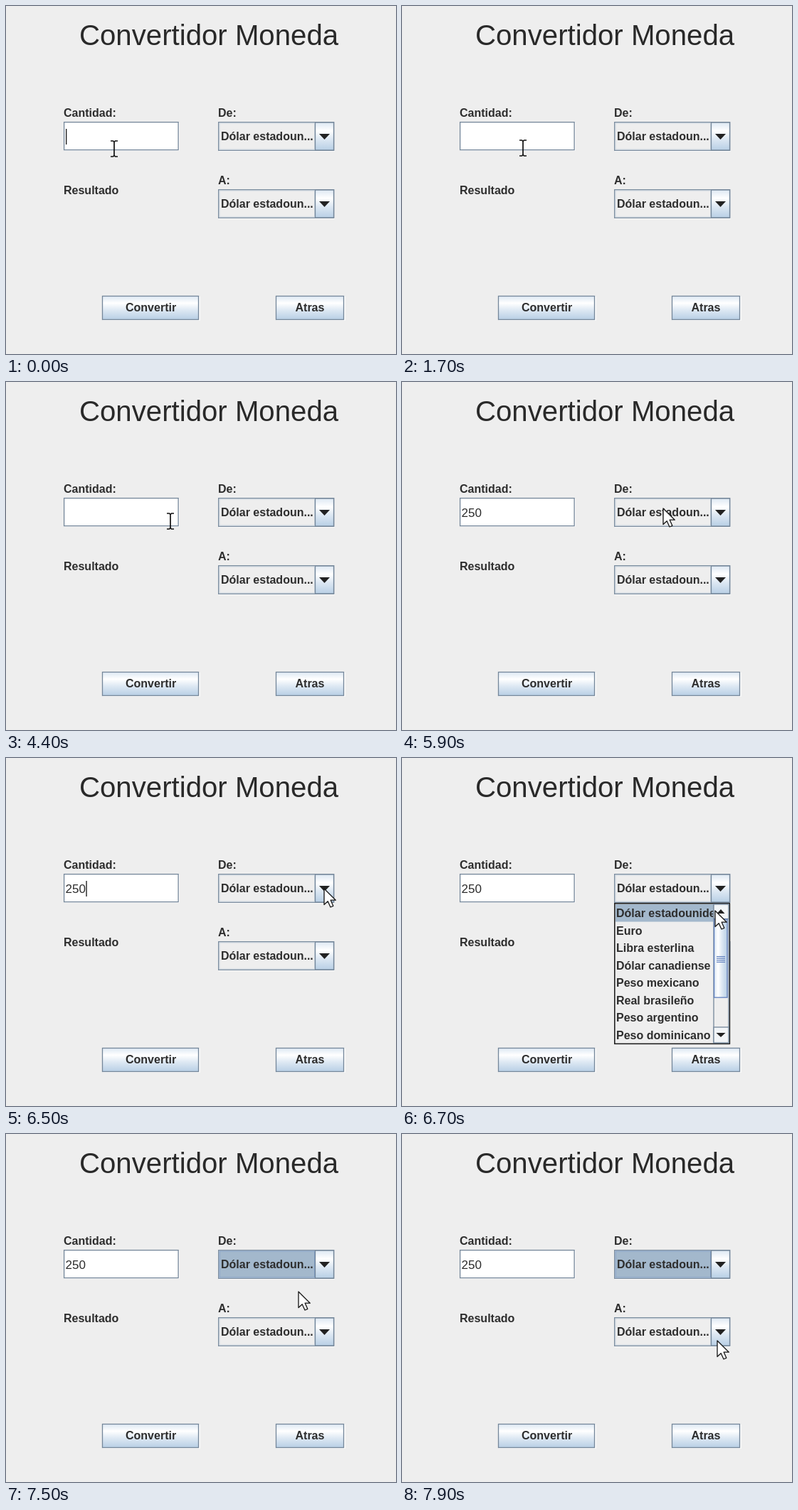
Animation of 548 by 490 pixels, one loop 8 s. Source, as an HTML page:

```html
<!DOCTYPE html>
<html lang="es">
<head>
<meta charset="utf-8">
<title>Convertidor Moneda</title>
<style>
  html, body { margin: 0; width: 100%; height: 100%; overflow: hidden; background: #eee; }
  svg { display: block; width: 548px; height: 490px; }
  text { font: bold 16px "Liberation Sans", Arial, sans-serif; fill: #2d2d2d; white-space: pre; }
  .title { font-weight: normal; font-size: 40.2px; fill: #292929; }
  .typed { font-weight: normal; font-size: 17px; }
  .edge { stroke: #75879a; stroke-width: 1.3; }
</style>
</head>
<body>
<svg id="stage" viewBox="0 0 548 490" xmlns="http://www.w3.org/2000/svg">
  <defs>
    <linearGradient id="steel" x2="0" y2="1">
      <stop offset="0" stop-color="#dde8f3"/>
      <stop offset=".3" stop-color="#fff"/>
      <stop offset=".6" stop-color="#dde8f3"/>
      <stop offset="1" stop-color="#b8cfe5"/>
    </linearGradient>
    <linearGradient id="thumb">
      <stop offset="0" stop-color="#dde8f3"/>
      <stop offset=".3" stop-color="#fff"/>
      <stop offset=".6" stop-color="#dde8f3"/>
      <stop offset="1" stop-color="#b8cfe5"/>
    </linearGradient>
    <clipPath id="listClip"><rect x="300" y="206" width="137.5" height="195"/></clipPath>
  </defs>
</svg>
<script>
const LOOP = 8000, STEP = 100;
const ROW_TOP = 206, ROW_H = 24.55;
const OPEN = 6600, CLOSE = 7500;
const ITEMS = ['Dólar estadounidense', 'Euro', 'Libra esterlina', 'Dólar canadiense',
  'Peso mexicano', 'Real brasileño', 'Peso argentino', 'Peso dominicano'];

// [time, x, y] of the pointer's hot spot
const PATH = [
  [0, 152, 201], [1600, 152, 201], [1700, 170, 200], [1800, 222, 196], [1900, 252, 190],
  [2000, 240, 194], [2100, 231, 196], [5300, 231, 196], [5400, 229, 204], [5500, 224, 221],
  [5600, 222, 232], [5700, 222, 232], [5800, 290, 205], [5900, 367, 178], [6100, 415, 180],
  [6300, 440, 183], [6500, 447, 184], [6600, 448, 185], [6700, 440, 215], [6800, 425, 290],
  [6900, 416, 343], [7000, 414, 290], [7100, 414, 231], [7200, 412, 220], [7300, 410, 217],
  [7400, 410, 217], [7500, 411, 222], [7600, 418, 240], [7800, 440, 284], [7900, 443, 291]
];
const TYPING = [[0, ''], [4500, '2'], [4700, '25'], [5000, '250']];
const CARET = [[0, 300], [800, 1300], [1800, 2300], [2900, 3400], [3900, 4400],
  [4500, 5600], [6100, 6600]];

const stage = document.getElementById('stage');

function add(tag, attrs, parent = stage) {
  const el = document.createElementNS('http://www.w3.org/2000/svg', tag);
  for (const key in attrs) el.setAttribute(key, attrs[key]);
  parent.appendChild(el);
  return el;
}
const rect = (x, y, width, height, fill, parent, extra) =>
  add('rect', { x, y, width, height, fill, ...extra }, parent);
const path = (d, attrs, parent) => add('path', { d, ...attrs }, parent);
function label(str, x, y, parent, cls = '') {
  const el = add('text', { x, y, class: cls }, parent);
  el.textContent = str;
  return el;
}
const edged = (x, y, w, h, fill, parent) => rect(x, y, w, h, fill, parent, { class: 'edge' });

function button(str, x, w, textX) {
  rect(x + 1, 409, w + 1, 34, '#fafafa');
  edged(x + .5, 408.5, w - 1, 33, 'url(#steel)');
  label(str, textX, 430);
}

function combo(y) {
  rect(299, y + 1, 163, 41, '#fafafa');
  edged(298.7, y + .7, 162, 39.6, '#eee');
  rect(300, y + 2, 133.5, 37, 'none', stage, { stroke: '#c3d0dd', 'stroke-width': .8 });
  const focus = rect(300, y + 2, 133.5, 37, '#a3b8cc', stage,
    { stroke: '#7f9cc4', 'stroke-width': 1, visibility: 'hidden' });
  edged(434.5, y + 1, 26, 39, 'url(#steel)');
  path(`M440 ${y + 17}h15l-7.5 8z`, { fill: '#222' });
  label('Dólar estadoun...', 302, y + 26);
  return focus;
}

label('Convertidor Moneda', 103, 54.5, stage, 'title');
label('Cantidad:', 81, 156);
label('De:', 298, 156);
label('A:', 298, 251);
label('Resultado', 81, 265);
rect(82, 164, 162, 40, '#fafafa');
edged(81.6, 163.6, 160.5, 39, '#fff');
const typed = label('', 83.5, 190, stage, 'typed');
const caret = rect(84, 173, 1.4, 22, '#222');
const focus = combo(163);
combo(258);
button('Convertir', 135, 136, 168);
button('Atras', 379, 96, 406.5);

// Drop-down list
const popup = add('g', {});
rect(298.8, 204.8, 161.6, 197.6, '#eee', popup, { stroke: '#161616', 'stroke-width': 1.5 });
const rows = add('g', { 'clip-path': 'url(#listClip)' }, popup);
const bar = rect(300, ROW_TOP, 138, ROW_H, '#a3b8cc', rows);
ITEMS.forEach((name, i) => label(name, 301, 224 + i * ROW_H, rows));
edged(438, 206, 21, 195, '#eee', popup);
edged(438, 206, 21, 20.5, '#f2f5f8', popup);
path('M442.5 219h11l-5.5 -6z', { fill: '#222' }, popup);
edged(438, 379, 21, 22, '#f2f5f8', popup);
path('M441.5 387h13l-6.5 6z', { fill: '#222' }, popup);
rect(438.6, 227.2, 18.4, 110, 'url(#thumb)', popup, { stroke: '#6382bf', 'stroke-width': 1.3 });
for (let y = 279; y < 288; y += 2.6)
  rect(442, y, 12, 1.2, '#6382bf', popup);

const beam = path('M-5 -11H-1.5L0 -9.5L1.5 -11H5M0 -10V10M-5 11H-1.5L0 9.5L1.5 11H5',
  { fill: 'none', stroke: '#111', 'stroke-width': 1.7 });
const arrow = path('M0 0V22.5L5.2 17.7L9 26L12.8 24.3L9.2 16.2H16.3Z',
  { fill: '#fff', stroke: '#151515', 'stroke-width': 1.3, 'stroke-linejoin': 'round' });

const show = (el, on) => el.setAttribute('visibility', on ? 'visible' : 'hidden');

function pointerAt(t) {
  const next = PATH.findIndex(key => key[0] > t);
  if (next < 0) return PATH[PATH.length - 1].slice(1);
  const [t0, x0, y0] = PATH[next - 1], [t1, x1, y1] = PATH[next];
  const k = (t - t0) / (t1 - t0);
  return [x0 + (x1 - x0) * k, y0 + (y1 - y0) * k];
}

function draw(time) {
  const t = Math.floor((time % LOOP) / STEP) * STEP;
  const [x, y] = pointerAt(t);

  const entry = TYPING.filter(key => key[0] <= t).pop()[1];
  if (typed.textContent !== entry) typed.textContent = entry;
  caret.setAttribute('x', 84 + entry.length * 9.45);
  show(caret, CARET.some(([on, off]) => t >= on && t < off));

  show(popup, t >= OPEN && t < CLOSE);
  show(focus, t >= CLOSE);
  const row = x > 437 ? 0 : Math.max(0, Math.min(7, Math.floor((y - ROW_TOP) / ROW_H)));
  bar.setAttribute('y', ROW_TOP + row * ROW_H);

  const inField = x > 81 && x < 242 && y > 163 && y < 204;
  show(beam, inField);
  show(arrow, !inField);
  (inField ? beam : arrow).setAttribute('transform', `translate(${x} ${y})`);
}

const start = performance.now();
function tick() {
  draw(performance.now() - start);
  requestAnimationFrame(tick);
}
tick();
</script>
</body>
</html>
```
